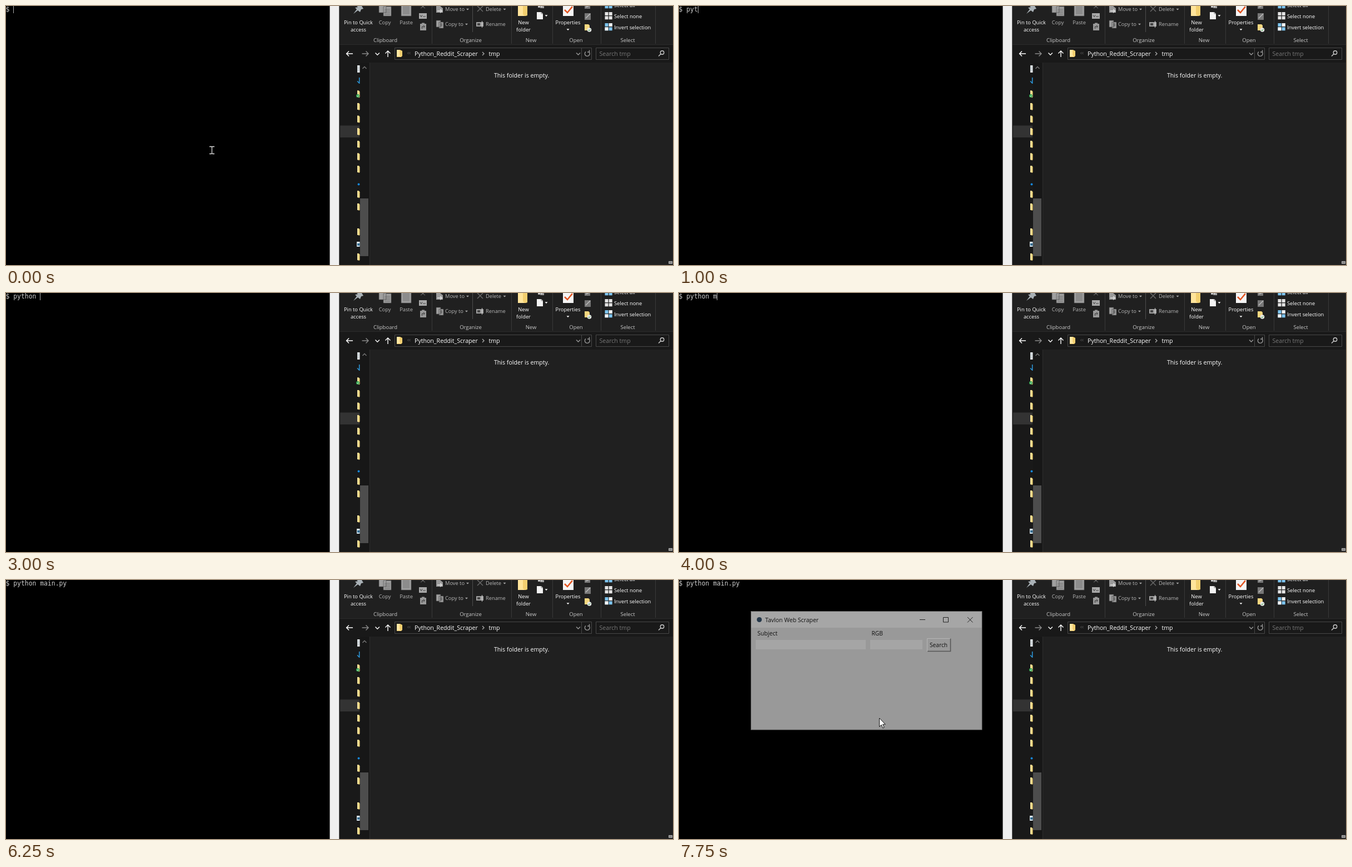
These frames come from a looping animation (1200 by 467 pixels, 8 s). An HTML page:

```html
<!DOCTYPE html>
<html lang="en">
<head>
<meta charset="utf-8">
<title>Terminal and file explorer</title>
<style>
  html, body { margin: 0; width: 100%; height: 100%; overflow: hidden; background: #000; }
  svg { display: block; width: 1200px; height: 467px; }
  text { font: 10.6px "Open Sans", "Noto Sans", sans-serif; fill: #fff; white-space: pre; }
  .ribbon text { font-size: 9.3px; }
  .mid text { text-anchor: middle; }
  .ribbon .dim text { fill: #b6b6b6; }
  .ribbon .label text { fill: #c8c8c8; font-size: 9.5px; }
  #prompt { font: 11.4px "DejaVu Sans Mono", monospace; fill: #ccc; }
  .line { fill: none; stroke: #fff; stroke-width: 1.4; }
  .app text { fill: #111; }
</style>
</head>
<body>
<svg viewBox="0 0 1200 467" xmlns="http://www.w3.org/2000/svg">
  <defs>
    <g id="sliver">
      <path d="M0-6h3l1.5 2v9.5l-1.2 1.5L0 5z" fill="#f5d37b"/>
      <path d="M0-6h2v12H0z" fill="#ffe7a3"/>
    </g>
    <path id="caret" d="M-2.5-1.2h5L0 1.6z"/>
    <g id="tiles"><path d="M0 0h6v6H0zM7.2 0h6v6h-6zM0 7.2h6v6H0zM7.2 7.2h6v6h-6z"/></g>
  </defs>

  <!-- Terminal -->
  <rect width="583" height="467"/>
  <text id="prompt" x="-.5" y="10"></text>
  <rect id="caretBar" width="1" height="13" fill="#aaa"/>
  <path id="beam" d="M366 253.5h3.5l1 1 1-1h3.5M370.5 254v12M366 266.5h3.5l1-1 1 1h3.5" fill="none" stroke="#ddd" stroke-width="1.3"/>

  <!-- Explorer -->
  <rect x="582.5" width="17" height="467" fill="#f0f0f0"/>
  <rect x="599" width="1" height="467" fill="#555"/>
  <rect x="600" width="600" height="467" fill="#191919"/>
  <rect x="600" width="600" height="69" fill="#202020"/>
  <rect x="654" y="102" width="546" height="365" fill="#202020"/>
  <path d="M600 69.5h600M654.5 102v365" stroke="#2b2b2b"/>

  <g class="ribbon">
    <path d="M766.5 0v68M909.5 0v68M983.5 0v68M1070.5 0v68M1168.5 0v68" stroke="#393939"/>
    <path d="M839.5 0v47" stroke="#4c4c4c"/>

    <path d="M631 0h9l3 5-4 1-2 5-4-3-8 6 6-8-3-3 5-1z" fill="#a9b1b6"/>
    <g fill="#a0a0a0" stroke="#555" stroke-width=".7">
      <path d="M671 -2h13v14h-13zM679 1h14v17h-14z"/>
      <path d="M681 6h10M681 9h10M681 12h10M681 15h10"/>
      <path d="M711-2h18v20h-18z"/>
    </g>
    <path d="M714 0h12v15h-12z" fill="#8c8c8c"/>
    <path d="M746 4l7-5M754 4l-7-5" stroke="#777" fill="none"/>
    <path d="M743 13h14v10h-14z" fill="#aaa"/>
    <path d="M745 16l2 4 2-4M750 19h5" stroke="#444" fill="none"/>
    <path d="M745 32h11v12h-11zM748 30.500h5v2h-5z" fill="#999"/>
    <path d="M748.500 41v-4h4M751 35l2.500 2-2.500 2.500" stroke="#333" fill="none"/>

    <path d="M774 0h7l5 4v8h-12z" fill="#999"/>
    <path d="M776 8h5V5l5 4-5 4v-3h-5z" fill="#d0d0d0"/>
    <path d="M774 26h8v12h-8zM779 29h8v11h-8z" fill="#a0a0a0" stroke="#444" stroke-width=".7"/>
    <path d="M781 32h4M781 34h4M781 36h4" stroke="#444"/>
    <path d="M848 0l10 10M858 0l-10 10" stroke="#666" stroke-width="1.5"/>
    <path d="M846 29h13v8h-13z" fill="#a0a0a0"/>
    <path d="M848 31h5v4h-5z" fill="#444"/>
    <path d="M856.500 27v12" stroke="#ccc"/>

    <path d="M921-2h12l5 2v17l-3 1H921z" fill="#f3cf70"/>
    <path d="M921-2h9v17l3 3h-12z" fill="#ffe49b"/>
    <path d="M957-2h9v5h-9zM961 0h7v4h-7z" fill="#ddd" stroke="#333" stroke-width=".6"/>
    <path d="M955 11h8l3 3v10h-11z" fill="#f3f3f3"/>
    <path d="M963 11v3h3" fill="none" stroke="#888"/>
    <path d="M1002-2h19v20h-19z" fill="#f5f5f5"/>
    <path d="M1005 7l5 5 9-11" fill="none" stroke="#e3531f" stroke-width="2.500"/>
    <path d="M1041-2h10v7h-10zM1041 13h11v12h-11z" fill="#777"/>
    <path d="M1043 22l8-8M1043 2l7-3" stroke="#bbb" stroke-width="1.500"/>
    <path d="M1041 33h7l2 2v9h-9z" fill="#f6d77f"/>
    <circle cx="1049.500" cy="43" r="3.800" fill="#e9e9e9"/>
    <path d="M1047.500 43l1.500 1.800 2.500-3" fill="none" stroke="#369b3d"/>

    <use href="#tiles" x="1077.500" y="-9" fill="#7cc4ef"/>
    <use href="#tiles" x="1077.500" y="11" fill="#e4e4e4"/>
    <use href="#tiles" x="1077.500" y="31" fill="#7cc4ef"/>
    <path d="M1077.500 38.200h6v6h-6zM1084.700 31h6v6h-6z" fill="#f1f1f1"/>

    <g class="mid">
      <text x="634" y="33">Pin to Quick</text><text x="634" y="46">access</text>
      <text x="931" y="33">New</text><text x="931" y="46">folder</text>
      <text x="1011" y="33">Properties</text>
      <g class="dim"><text x="681.500" y="33">Copy</text><text x="720" y="33">Paste</text></g>
      <g class="label">
        <text x="682.500" y="64.500">Clipboard</text><text x="836" y="64.500">Organize</text>
        <text x="944.500" y="64.500">New</text><text x="1025.500" y="64.500">Open</text>
        <text x="1118.500" y="64.500">Select</text>
      </g>
    </g>
    <g class="dim">
      <text x="790" y="9">Move to</text><text x="790" y="36">Copy to</text>
      <text x="863" y="9">Delete</text><text x="863" y="36">Rename</text>
    </g>
    <text x="1094" y="2">Select all</text>
    <text x="1094" y="21.500">Select none</text>
    <text x="1094" y="41.500">Invert selection</text>
    <g fill="#aaa">
      <use href="#caret" x="830.500" y="6"/><use href="#caret" x="828.500" y="33"/><use href="#caret" x="897" y="6"/>
    </g>
    <g fill="#fff"><use href="#caret" x="972" y="17.500"/><use href="#caret" x="1011" y="42.500"/></g>
  </g>

  <!-- Address row -->
  <path class="line" d="M624 86h-11.500M617 81.500l-4.500 4.500 4.500 4.500M664.500 84.500l3.700 3.700 3.700-3.700M687 92V81M682.500 85.500L687 81l4.500 4.500"/>
  <path class="line" d="M640.500 86H652M647.500 81.500l4.500 4.500-4.500 4.500" style="stroke:#8a8a8a"/>
  <path d="M699.500 75.500h354v21h-354zM1061.500 75.500h131v21h-131zM1035.500 76v20" fill="none" stroke="#484848"/>
  <path d="M703 79h6l4 2v9l-2 2h-8z" fill="#f3cf70"/>
  <path d="M703 79h5v9l2 3h-7z" fill="#ffe7a3"/>
  <path d="M724.500 83l-2 2 2 2M727.500 83l-2 2 2 2" fill="none" stroke="#666" stroke-width=".8"/>
  <text x="735" y="90">Python_Reddit_Scraper</text>
  <path class="line" d="M857 83l3 3-3 3" style="stroke:#aaa"/>
  <text x="868.500" y="90">tmp</text>
  <path class="line" d="M1026 84.500l3.500 3.500 3.500-3.500M1048.500 82.500a4.400 4.400 0 1 1-5.500 0M1049.500 79.500v3.500h-3.500" style="stroke:#999"/>
  <text x="1067.500" y="90" style="fill:#777">Search tmp</text>
  <circle class="line" cx="1180.500" cy="84" r="3.200" style="stroke:#ccc"/>
  <path class="line" d="M1178 86.500l-4 4" style="stroke:#ccc"/>

  <!-- Navigation pane -->
  <rect x="601" y="215.500" width="35" height="21.500" fill="#333"/>
  <g id="folders"></g>
  <path d="M632 107h4.500v13H632z" fill="#e4e8ea"/>
  <path d="M633 110h2M633 113h2M633 116h2" stroke="#8da0aa"/>
  <path d="M635.700 129v11M632 135.500l4 4" fill="none" stroke="#2d9be0" stroke-width="1.500"/>
  <circle cx="633" cy="162" r="3" fill="#35a853"/>
  <path d="M631.500 162l1.200 1.300 2-2.600" fill="none" stroke="#fff" stroke-width=".8"/>
  <circle cx="634.500" cy="321.500" r="2" fill="#1687d9"/>
  <path d="M631 425h5.500v9H631z" fill="#d8e8f2"/>
  <path d="M632 428h4.500v4H632z" fill="#386f92"/>
  <rect x="637" y="103" width="15.500" height="364" fill="#171717"/>
  <rect x="637" y="347" width="15" height="104" fill="#4d4d4d"/>
  <path class="line" d="M641.500 113l3.500-3.500 3.500 3.500" style="stroke:#777"/>

  <text x="878" y="129">This folder is empty.</text>
  <path d="M1192.500 460.500h6v4h-6z" fill="#888" stroke="#aaa"/>

  <!-- Application window -->
  <g id="app" class="app">
    <rect x="130" y="57" width="415" height="213" fill="#999"/>
    <rect x="130" y="57" width="415" height="29" fill="#a6a6a6"/>
    <rect x="129.500" y="56.500" width="415.500" height="213.500" fill="none" stroke="#777" stroke-width=".8"/>
    <circle cx="144.500" cy="71.500" r="4.500" fill="#25384a"/>
    <text x="155" y="76" style="font-size:10.500px">Tavlon Web Scraper</text>
    <path d="M433 71.500h10M475.500 67.500h9v8.500h-9zM519 67l9.500 9.500M528.500 67l-9.500 9.500" fill="none" stroke="#222"/>
    <text x="141" y="100">Subject</text>
    <text x="346.500" y="100" style="font-size:10.200px">RGB</text>
    <path d="M138 108h198v17H138zM344 108h94v17h-94z" fill="#a5a5a5"/>
    <path d="M446.500 129v-23.500H489" fill="none" stroke="#b5b5b5"/>
    <path d="M447 128.500h41.500V105.500" fill="none" stroke="#555" stroke-width="1.500"/>
    <text x="451" y="121" style="font-size:10.200px">Search</text>
    <path d="M360.500 249v15.500l3.600-3.400 2.600 5.800 2.400-1-2.600-5.700h4.700z" fill="#fff" stroke="#000" stroke-width=".9"/>
  </g>
</svg>
<script>
const LOOP = 8000, CHAR = 6.87;
const byId = id => document.getElementById(id);
const show = (id, on) => byId(id).setAttribute("visibility", on ? "visible" : "hidden");

// [time, typed text, caret visible]
const typing = [
  [0, "", true], [250, "", false], [750, "p", true], [1000, "pyt", true],
  [1250, "pyth", true], [1500, "pytho", true], [2250, "pythonn", true],
  [3000, "python ", true], [3500, "python ", false], [4000, "python m", true],
  [4250, "python mai", true], [4750, "python main", true], [5000, "python main.", true],
  [5500, "python main.", false], [5750, "python main.py ", true], [6250, "python main.py ", false]
];

// Rows of the tree that hold a folder; the others carry their own icons.
byId("folders").innerHTML = [0, 1, 2, 3, 4, 5, 6, 8, 9, 11, 13]
  .map(row => `<use href="#sliver" x="632" y="${158.500 + row * 22.6}"/>`).join("");

function render(time) {
  const [, typed, caret] = typing.findLast(([start]) => start <= time);
  const line = "$ " + typed;
  byId("prompt").textContent = line;
  byId("caretBar").setAttribute("x", Math.round(line.length * CHAR - .7));
  show("caretBar", caret);
  show("beam", time < 750);
  show("app", time >= 7750);
}

const begin = performance.now();
function tick() {
  render((performance.now() - begin) % LOOP);
  requestAnimationFrame(tick);
}
tick();
</script>
</body>
</html>
```
